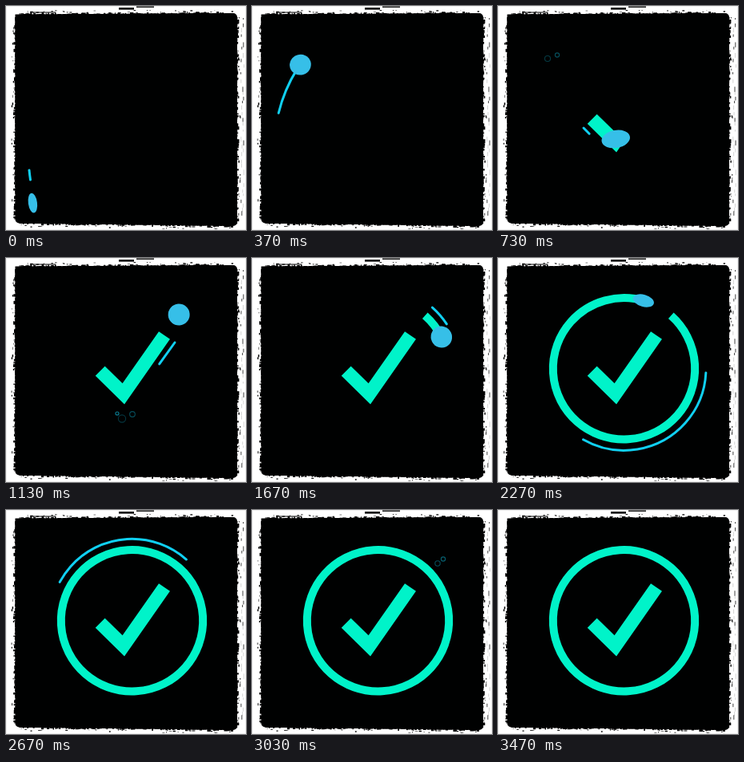
Recreate the animation shown at these times as an HTML page with a canvas. Size 300 px wide and 281 px high, loop 3510 ms.

```html
<!DOCTYPE html>
<html lang="en">
<head>
<meta charset="utf-8">
<title>Check mark</title>
<style>
  html, body { margin: 0; width: 100%; height: 100%; overflow: hidden; background: #fff; }
  canvas { display: block; }
</style>
</head>
<body>
<canvas id="stage" width="300" height="281"></canvas>
<script>
const LOOP = 3510, GREEN = '#00f3c9', BLUE = '#36bfe8', CYAN = '#10d0f2';
const CX = 157.5, CY = 138.8, RING_R = 88.7, TRAIL_R = 102.5, START = -48.5, BALL_R = 13.5;
const LEG = 41, CORNER_TIME = 730, RING_TIME = 1490;

const rad = deg => deg * Math.PI / 180;
const mix = (a, b, u) => a + (b - a) * u;
const span = (t, from, to) => Math.min(1, Math.max(0, (t - from) / (to - from)));
const bezier = (a, b, c, d, u) => {
  const v = 1 - u;
  return a * v ** 3 + 3 * b * v * v * u + 3 * c * v * u * u + d * u ** 3;
};
const ctx = document.getElementById('stage').getContext('2d');

const circlePath = r => {
  const path = new Path2D();
  path.arc(CX, CY, r, rad(START), rad(START + 360));
  return path;
};
const checkPath = new Path2D('M117.7 141.8 L146.8 170.4 L198 97');
const ringPath = circlePath(RING_R);

// Each trail's two ends accelerate along its path during their own time span.
const trails = [
  { path: new Path2D('M30.5 218 Q17.5 130 66 65'), length: 172, lead: [-150, 420], tail: [0, 530] },
  { path: new Path2D('M107 153 L147.8 194.5 L211 106'), length: 167, lead: [600, 1130], tail: [CORNER_TIME, 1178] },
  { path: circlePath(TRAIL_R), length: rad(360) * TRAIL_R, lead: [1410, 2670], tail: [1947, 2805] },
];

// Bubbles pop where a trail ends: [x, y, radius].
const bursts = [
  { start: 450, spots: [[62, 66, 3.4], [74, 61.5, 2.5]] },
  { start: 912, spots: [[139, 195, 2.2], [145, 201.5, 5], [158, 196, 3.6]] },
  { start: 2805, spots: [[232, 67, 3.4], [239, 61.5, 2.8]] },
];

function strokePart(path, from, to, color, width, cap = 'butt') {
  if (to - from < 0.3) return;
  ctx.setLineDash([to - from, 9999]);
  ctx.lineDashOffset = -from;
  ctx.strokeStyle = color;
  ctx.lineWidth = width;
  ctx.lineCap = cap;
  ctx.stroke(path);
  ctx.setLineDash([]);
}

function drawBurst(t, { start, spots }) {
  const p = span(t, start, start + 620);
  if (p === 0 || p === 1) return;
  ctx.strokeStyle = CYAN;
  ctx.lineWidth = 1.1;
  for (const [x, y, r] of spots) {
    ctx.globalAlpha = Math.min(1, 3.2 / r * (1 - p) ** 2);
    ctx.beginPath();
    ctx.arc(x, y, r * (0.5 + 1.2 * p), 0, 7);
    ctx.stroke();
  }
  ctx.globalAlpha = 1;
}

// Share of the ring drawn: slow start, fast middle, long settle.
function ringShare(t) {
  const u = span(t, RING_TIME, 2533), a = 1.47 * u * u;
  return a / (a + (1 - u) ** 2);
}

const rise = t => 1 - (1 - span(t, CORNER_TIME, 1350)) ** 2;
const fallBack = t => span(t, 1350, RING_TIME) ** 2;

// The ball leaps in, hits the check's corner, flies up, drops and runs round the ring.
function ballPose(t) {
  if (t < 660) {
    const u = t / 660, squeeze = (1 - u) ** 3;
    return {
      x: bezier(33.4, 30, 65, 118, u), y: bezier(248, 60, 20, 141.5, u), turn: mix(-98, 45, u),
      long: BALL_R - squeeze, wide: BALL_R * (1 - 0.59 * squeeze),
    };
  }
  if (t < RING_TIME) {
    const hit = span(t, 660, CORNER_TIME), up = rise(t) - 0.13 * fallBack(t);
    const squash = hit * (1 - span(t, CORNER_TIME, 1350)) ** 4;
    return {
      x: mix(118, 147, hit) + 79 * up, y: mix(141.5, 167.3, hit) - 110 * up, turn: mix(45, -10, hit) - 45 * up,
      long: BALL_R * (1 + 0.33 * squash), wide: BALL_R * (1 - 0.18 * squash),
    };
  }
  const angle = START + 360 * ringShare(t), squeeze = span(t, RING_TIME, 2533) ** 2;
  const size = BALL_R * (1 - span(t, 2380, 2533));
  return {
    x: CX + RING_R * Math.cos(rad(angle)), y: CY + RING_R * Math.sin(rad(angle)), turn: angle + 90,
    long: size, wide: size * (1 - 0.79 * squeeze),
  };
}

// Black panel with worn, inky edges.
function makePanel() {
  const panel = document.createElement('canvas');
  panel.width = 300;
  panel.height = 281;
  const g = panel.getContext('2d');
  let seed = 11;
  const rnd = () => (seed = seed * 16807 % 2147483647) / 2147483647;
  g.fillStyle = '#fff';
  g.fillRect(0, 0, 300, 281);
  g.strokeStyle = '#f0f0f0';
  g.strokeRect(0.5, 0.5, 299, 280);

  const corners = [[11.5, 10.5], [289, 9], [289, 276], [11.5, 272.5]];
  g.fillStyle = '#000101';
  g.beginPath();
  corners.forEach(([x, y], i) => {
    const [nx, ny] = corners[(i + 1) % 4];
    g.arcTo(x, y, nx, ny, 5);
    g.lineTo((x + nx) / 2, (y + ny) / 2);
  });
  g.fill();

  corners.forEach(([x, y], i) => {
    const [nx, ny] = corners[(i + 1) % 4], length = Math.hypot(nx - x, ny - y);
    g.save();
    g.translate(x, y);
    g.rotate(Math.atan2(ny - y, nx - x));
    for (let along = 5; along < length - 6; along += 1 + 3 * rnd()) {
      const depth = 2.5 * rnd() ** 3;
      g.fillRect(along, -depth, 1 + 4 * rnd(), depth + 1);
      if (rnd() < 0.4) g.fillRect(along, -1 - 4 * rnd() ** 2, 0.6 + 3 * rnd(), 0.5 + rnd());
    }
    g.restore();
  });

  for (let y = 15; y < 265; y += 4 + 6 * rnd()) {
    g.fillStyle = rnd() < 0.3 ? '#444' : '#d4d4d4';
    g.fillRect(293 + 4 * rnd(), y, 1, 2 + 5 * rnd());
  }
  g.fillStyle = '#000';
  g.fillRect(141, 2, 19, 2.6);
  g.fillRect(163, 0.5, 22, 1.4);
  g.fillRect(30, 7.5, 32, 1);
  return panel;
}
const panel = makePanel();

function draw(t) {
  ctx.drawImage(panel, 0, 0);

  const drawn = LEG * span(t, 640, CORNER_TIME) + (t < CORNER_TIME ? 0 : 4 + 136 * rise(t));
  strokePart(checkPath, 0, drawn, GREEN, 17);
  strokePart(ringPath, 0, rad(361) * RING_R * ringShare(t), GREEN, 10);

  for (const { path, length, lead, tail } of trails) {
    strokePart(path, length * span(t, ...tail) ** 2, length * span(t, ...lead) ** 2, CYAN, 3, 'round');
  }
  bursts.forEach(burst => drawBurst(t, burst));

  const { x, y, long, wide, turn } = ballPose(t);
  ctx.fillStyle = BLUE;
  ctx.beginPath();
  ctx.ellipse(x, y, long, wide, rad(turn), 0, 7);
  ctx.fill();
}

function tick() {
  draw(performance.now() % LOOP);
  requestAnimationFrame(tick);
}
tick();
</script>
</body>
</html>
```
